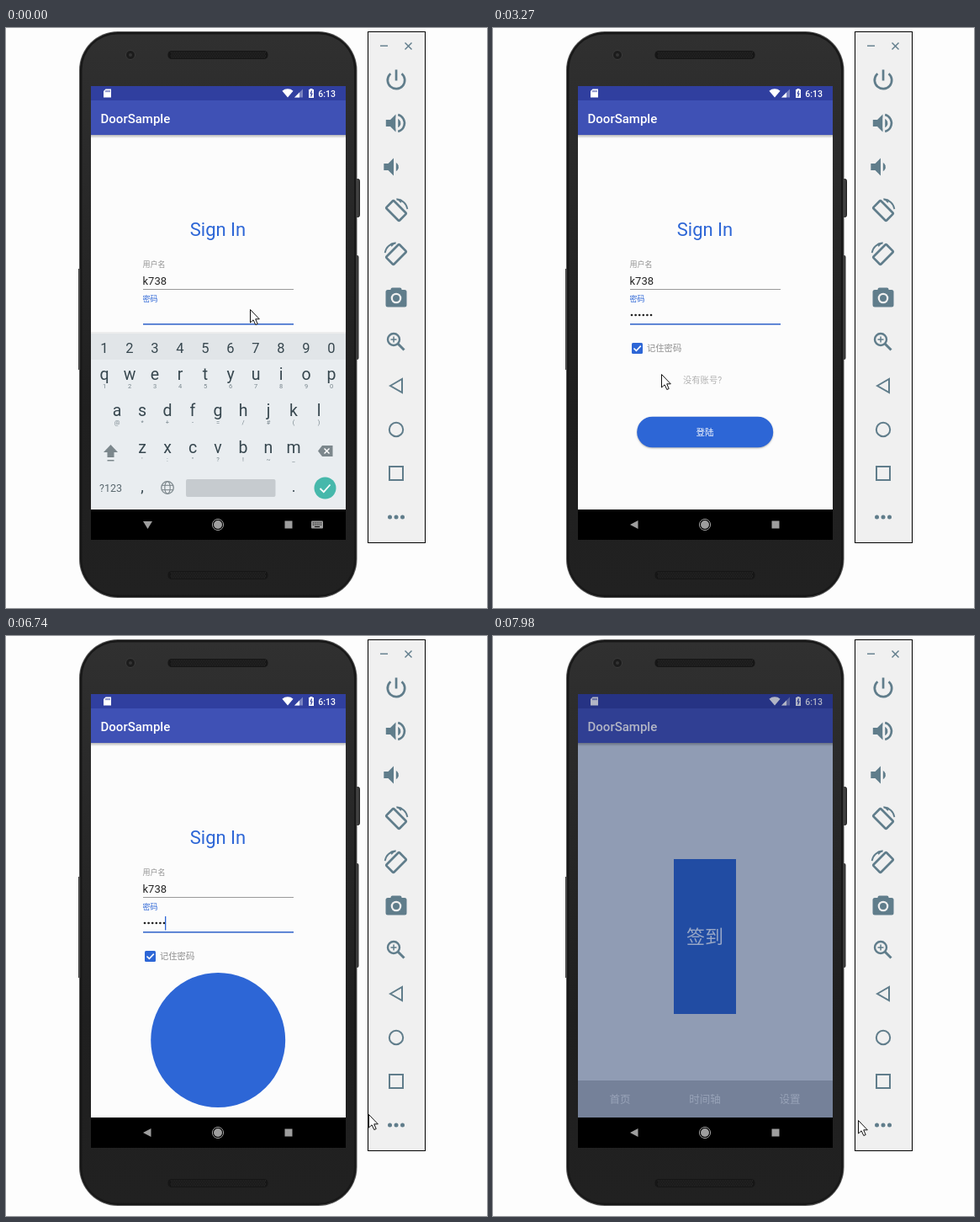
Write an HTML page with a canvas that moves like this. It is 572 by 689 pixels and loops after 8 s.

```html
<!DOCTYPE html>
<html lang="zh">
<head>
<meta charset="utf-8">
<title>Sign in</title>
<style>
html, body { margin: 0; width: 100%; height: 100%; overflow: hidden; background: #fdfdfd; }
canvas { display: block; }
</style>
</head>
<body>
<canvas id="stage" width="572" height="689"></canvas>
<script>
const g = document.getElementById('stage').getContext('2d');
const LOOP = 8000;
const BLUE = '#2d66d6', ICON = '#607d8b', INK = '#37474f', PANEL = '#f0f0f0';
const LATIN = 'Roboto, "Noto Sans CJK SC", "Noto Sans CJK", sans-serif';
const VIEW = [101, 127, 303, 445];
const RAD = Math.PI / 180;

// ---------- helpers ----------
const clamp = x => Math.max(0, Math.min(1, x));
const smooth = x => (1 - Math.cos(Math.PI * clamp(x))) / 2;

function rect(x, y, w, h, color) {
  g.fillStyle = color;
  g.fillRect(x, y, w, h);
}
function round(x, y, w, h, r, fill, stroke, lw = 1) {
  g.beginPath();
  g.roundRect(x, y, w, h, r);
  paint(fill, stroke, lw);
}
function arc(x, y, r, from, to, fill, stroke, lw = 1) {
  g.beginPath();
  g.arc(x, y, r, from * RAD, to * RAD);
  paint(fill, stroke, lw);
}
const circle = (x, y, r, ...style) => arc(x, y, r, 0, 360, ...style);
function poly(pts, fill, stroke, lw = 1) {
  g.beginPath();
  pts.forEach(([x, y]) => g.lineTo(x, y));
  g.closePath();
  paint(fill, stroke, lw);
}
function line(color, lw, ...pts) {
  g.beginPath();
  pts.forEach(([x, y]) => g.lineTo(x, y));
  paint(null, color, lw);
}
function cross(x, y, r, color, lw) {
  line(color, lw, [x - r, y - r], [x + r, y + r]);
  line(color, lw, [x + r, y - r], [x - r, y + r]);
}
function paint(fill, stroke, lw) {
  if (fill) { g.fillStyle = fill; g.fill(); }
  if (stroke) { g.strokeStyle = stroke; g.lineWidth = lw; g.stroke(); }
}
function text(s, x, y, size, color, align = 'left', weight = 400) {
  g.font = `${weight} ${size}px ${LATIN}`;
  g.textAlign = align;
  g.fillStyle = color;
  g.fillText(s, x, y);
}
function fade(y0, y1, ...stops) {
  const f = g.createLinearGradient(0, y0, 0, y1);
  stops.forEach((c, i) => f.addColorStop(i / (stops.length - 1), c));
  return f;
}
// draw in local units around a point
function at(x, y, sx, sy, drawing) {
  g.save();
  g.translate(x, y);
  g.scale(sx, sy);
  drawing();
  g.restore();
}

// ---------- phone ----------
function grill(y) {
  round(192.5, y, 119, 10, 4.5, '#161616');
  g.fillStyle = '#343434';
  for (let r = 0; r < 4; r++)
    for (let x = 196 + r % 2; x < 309; x += 2) g.fillRect(x, y + 1.5 + r * 2, 1, 1);
}
function phone() {
  round(415, 179.5, 5.5, 45, 2, '#3c3c3c', '#222');
  round(414, 270, 5.5, 124, 2, '#333');
  rect(86, 286, 2, 120, '#3a3a3a');
  round(87, 4, 330.5, 673, 46, '#555');
  round(88, 5, 328.5, 671, 45, '#181818');
  round(90.5, 7.5, 323.5, 666, 42, fade(8, 674, '#303030', '#272727', '#1f1f1f', '#212121'));
  circle(148, 32, 5.5, '#1c1c1c', '#3b3b3b');
  circle(148, 32, 2, '#333');
  grill(27);
  grill(645);
}

// ---------- emulator panel ----------
function speaker(x, y, loud) {
  at(x, y, 1.3, 1.3, () => {
    poly([[-9, -3], [-5, -3], [0, -8], [0, 8], [-5, 3], [-9, 3]], ICON);
    arc(0, 0, 4.5, -63, 63, ICON);
    rect(0, -5, 2, 10, PANEL);
    if (loud) arc(0, 0, 8, -75, 75, null, ICON, 2);
  });
}
function turn(y, side) {
  at(464, y, side, 1, () => {
    arc(0, 0, 13.5, -88, -8, null, ICON, 1.8);
    poly([[0, -14.5], [5.5, -9], [7, -13]], ICON);
    g.rotate(Math.PI / 4);
    round(-11, -6.3, 22, 12.6, 1.5, PANEL, ICON, 2.7);
  });
}
function panel() {
  rect(430, 4, 69, 608, '#000');
  rect(431, 5, 67, 606, PANEL);
  rect(445, 20.5, 9, 1.4, ICON);
  cross(478.5, 21.5, 4, ICON, 1.4);
  arc(464, 62, 10.2, -50, 230, null, ICON, 2.7);
  rect(462.7, 49.5, 2.7, 13, ICON);
  speaker(463.5, 113, true);
  speaker(461, 165, false);
  turn(217, 1);
  turn(269, -1);
  round(457.5, 308.5, 13, 8, 2, ICON);
  round(451.5, 311, 25, 20.5, 2.5, ICON);
  circle(464, 321, 6.3, PANEL);
  circle(464, 321, 4, ICON);
  circle(461, 370, 7, null, ICON, 2.4);
  line(ICON, 3, [466, 375], [473.5, 382.5]);
  rect(457.5, 369.3, 7, 1.5, ICON);
  rect(460.3, 366.5, 1.5, 7, ICON);
  poly([[457, 425], [471, 417], [471, 433]], null, ICON, 2);
  circle(464, 477, 8.2, null, ICON, 2);
  round(456, 521, 16, 16, 0, null, ICON, 2);
  for (let i = 0; i < 3; i++) circle(456.5 + i * 7.5, 581, 2.5, ICON);
}

// ---------- system bars ----------
function bars(dim) {
  const fg = '#fff', back = '#303f9f';
  rect(101, 69, 303, 17, back);
  rect(101, 86, 303, 41, '#3f51b5');
  text('DoorSample', 112.5, 113, 15, fg, 'left', 500);
  poly([[118.5, 72.5], [125, 72.5], [125, 82.5], [116, 82.5], [116, 75]], fg);
  for (let i = 0; i < 3; i++) rect(118.5 + i * 2, 74, 1, 2.2, back);
  g.beginPath();
  g.moveTo(335, 82.5);
  g.arc(335, 82.5, 10.2, -130 * RAD, -50 * RAD);
  paint(fg);
  poly([[343, 82.5], [353, 72.5], [353, 82.5]], 'rgba(255,255,255,.35)');
  poly([[343, 82.5], [349, 76.5], [349, 82.5]], fg);
  rect(360, 73, 6, 10, fg);
  rect(361.5, 72, 3, 1, fg);
  line(back, 1.2, [363.6, 74.5], [362.3, 78], [364, 78], [362.6, 81.5]);
  text('6:13', 371.3, 81.7, 10.5, fg, 'left', 500);
  if (dim) rect(101, 69, 303, 58, `rgba(18,25,75,${0.32 * dim})`);
}
function navBar(keys) {
  const c = '#9e9e9e';
  rect(101, 572, 303, 36, '#000');
  poly(keys ? [[163, 586], [174, 586], [168.5, 595]] : [[163, 590], [172.5, 585], [172.5, 595]], c);
  circle(252, 590, 5, c);
  circle(252, 590, 6.6, null, c);
  rect(331.5, 585.5, 9, 9, c);
  if (!keys) return;
  round(363, 585.5, 14, 9, 1, c);
  for (let i = 0; i < 10; i++)
    rect(364.8 + i % 5 * 2.3, i < 5 ? 587.3 : 589.6, 1.1, 1.1, '#000');
  rect(367, 592, 6, 1, '#000');
}

// ---------- keyboard ----------
function keyRow(letters, hints, x, y) {
  [...letters].forEach((c, i) => {
    text(c, x + i * 30, y, 19.5, INK, 'center');
    text(hints[i], x + i * 30, y + 10, 7.5, '#78868d', 'center');
  });
}
function keyboard() {
  const soft = '#7c878c';
  rect(101, 361, 303, 2, 'rgba(0,0,0,.06)');
  rect(101, 363, 303, 210, '#e9edf0');
  rect(101, 363, 303, 31, '#e1e5e8');
  [...'1234567890'].forEach((c, i) => text(c, 117 + i * 30, 386, 16.5, INK, 'center'));
  keyRow('qwertyuiop', '1234567890', 117, 418);
  keyRow('asdfghjkl', '@*+-=/#()', 132, 461);
  keyRow('zxcvbnm', '\':"?!~_', 162, 505);
  poly([[124.5, 495], [133, 504], [116, 504]], soft);
  rect(120.5, 503, 8, 7, soft);
  rect(120.5, 513, 8, 1.5, soft);
  poly([[371, 502.5], [376, 496], [388.5, 496], [388.5, 509], [376, 509]], soft);
  cross(381.5, 502.5, 3, '#fff', 1.4);
  text('?123', 124.5, 551, 12.5, '#59676e', 'center');
  text(',', 162, 551, 18, INK, 'center');
  text('.', 342, 551, 18, INK, 'center');
  circle(192, 546, 7.3, null, soft, 1.3);
  g.beginPath();
  g.ellipse(192, 546, 3.2, 7.3, 0, 0, 7);
  paint(null, soft, 1.1);
  for (const y of [543.3, 548.7]) line(soft, 1.1, [185.4, y], [198.6, y]);
  round(214, 536, 106.5, 21, 2, '#c6cbcf');
  circle(379.5, 546.5, 13, '#46b8ab');
  line('#fff', 1.8, [373.5, 547], [377.8, 551.2], [385.5, 542.5]);
}

// ---------- sign in form ----------
function password(t) {
  const typed = t < 250 ? 0 : Math.min(6, 2 + Math.floor((t - 250) / 112));
  const open = typed && t < 2190;
  const dots = open ? typed - 1 : typed;
  for (let i = 0; i < dots; i++) circle(165 + i * 4.6, 341, 1.35, '#222');
  let end = 162.5 + dots * 4.6;
  if (open) {
    text(String(typed), end, 345.5, 13, '#222');
    end += 7;
  }
  const blink = (t - 580 + LOOP) % 1000 < 500;
  if (typed && (t < 1220 || blink)) rect(Math.round(end - 1), 333, 1.3, 16.5, BLUE);
}

// the arc grows and shrinks by turns while it rotates
function spinner(t) {
  const phase = (t - 4030) / 900, n = Math.floor(phase);
  const part = 260 * (1 - (1 - phase + n) ** 2);
  let start = 101 + (t - 4080) * 0.18 - 100 * Math.floor((n + 1) / 2);
  let sweep = part + 50;
  if (n % 2 === 0) { start += part; sweep = 310 - part; }
  arc(252.2, 480, 14, start, start + sweep, null, '#fff', 1.4);
}

function loginButton(t) {
  const w = 162 - 125 * smooth((t - 3840) / 310);
  g.save();
  g.shadowColor = 'rgba(0,0,0,.3)';
  g.shadowBlur = 2;
  g.shadowOffsetY = 1;
  round(252.2 - w / 2, 461.7, w, 36.6, 18.3, BLUE);
  g.restore();
  if (t < 3840) text('登陆', 252, 484, 10.5, '#fff', 'center', 500);
  else if (t < 6620) spinner(t);
}

function form(t) {
  text('Sign In', 252, 247, 22, BLUE, 'center');
  text('用户名', 162.5, 283.5, 9, '#909090');
  text('k738', 162.5, 304.5, 13, '#222');
  rect(163, 310, 179, 1, '#9a9a9a');
  text('密码', 162.5, 324.5, 9, BLUE);
  password(t);
  rect(163, 351, 179, 1.7, '#4472cf');
  if (t < 2190) return keyboard();

  if (t < 3150) round(165.7, 374.7, 11.6, 11.6, 1.5, null, '#6a6a6a', 1.5);
  else {
    round(165, 374, 13, 13, 1.5, BLUE);
    line('#fff', 1.6, [167.5, 380.5], [170.4, 383.4], [175.8, 377.6]);
  }
  text('记住密码', 183, 384, 10.3, '#8c8c8c');
  text('没有账号?', 226, 421.5, 10.3, '#b0b0b0');
  loginButton(t);
  if (t >= 6620) circle(252.2, 480, 18.3 + 293.7 * smooth((t - 6624) / 386), BLUE);
}

// ---------- next page, coming in dimmed ----------
function home() {
  rect(...VIEW, '#909cb4');
  rect(215, 265, 74, 184, '#214ca3');
  text('签到', 252, 365, 22, '#98a7c6', 'center');
  rect(101, 528, 303, 45, '#758199');
  ['首页', '时间轴', '设置'].forEach((s, i) => text(s, 151 + i * 101, 555, 12.5, '#98a3b8', 'center'));
}

// ---------- pointer ----------
// each move: start, end, x, y
const MOVES = [[1220, 1610, 503, 434], [1610, 1880, 467, 424], [2060, 2340, 239, 388],
  [2340, 2600, 172, 379], [3150, 3540, 262, 482], [3810, 4080, 310, 534],
  [4080, 4360, 401, 542], [5900, 6300, 431, 568], [7600, 7980, 434, 575]];

function pointer(t) {
  let x = 290, y = 334;
  for (const [from, to, px, py] of MOVES) {
    const p = clamp((t - from) / (to - from));
    x += (px - x) * p;
    y += (py - y) * p;
  }
  at(Math.round(x) + 0.5, Math.round(y) + 0.5, 1, 1, () =>
    poly([[0, 0], [0, 15.5], [3.6, 12.3], [6.3, 18], [8.7, 17], [6.2, 11.3], [10.8, 11.3]], '#fff', '#111'));
}

function draw(t) {
  const next = t < 7710 ? 0 : clamp(0.3 + (t - 7710) / 270 * 0.7);
  rect(0, 0, 572, 689, '#fdfdfd');
  phone();
  panel();
  g.save();
  g.beginPath();
  g.rect(...VIEW);
  g.clip();
  rect(...VIEW, '#fcfcfc');
  form(t);
  g.globalAlpha = clamp((t - 7150) / 290);
  rect(...VIEW, BLUE);
  g.globalAlpha = next;
  if (next) home();
  g.globalAlpha = 1;
  rect(101, 127, 303, 4, fade(127, 131, 'rgba(0,0,0,.28)', 'rgba(0,0,0,0)'));
  g.restore();
  bars(next);
  navBar(t < 2190);
  pointer(t);
}

const begin = performance.now();
function frame() {
  draw((performance.now() - begin) % LOOP);
  requestAnimationFrame(frame);
}
frame();
</script>
</body>
</html>
```
